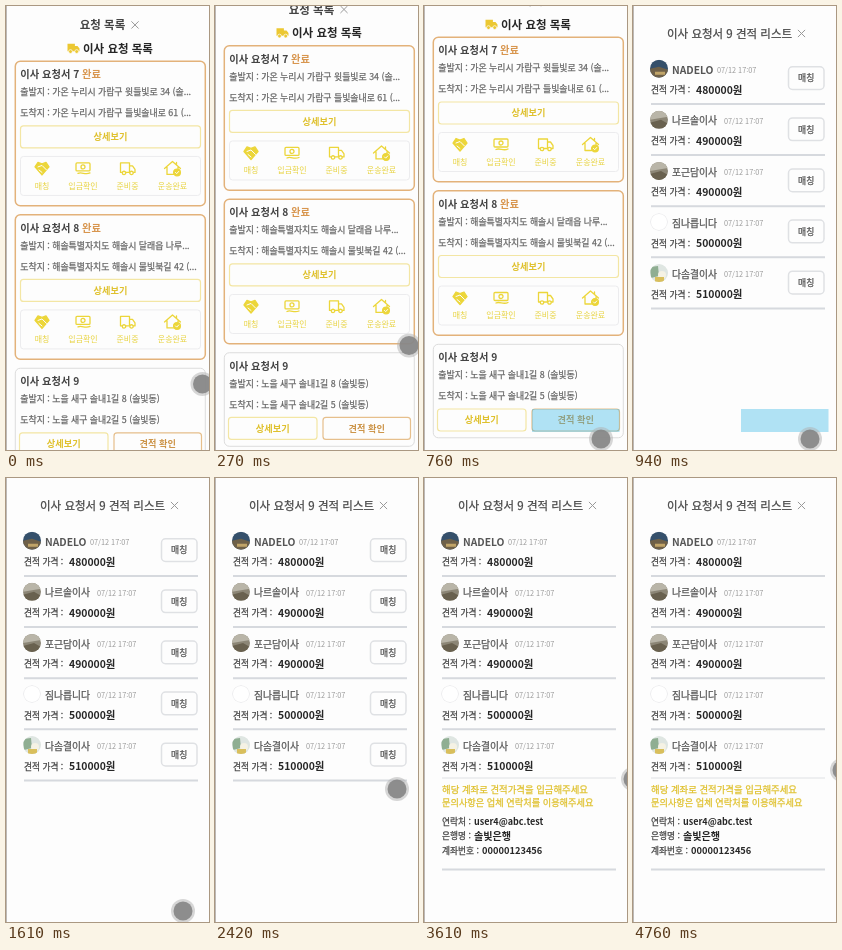
Write an HTML page that moves like this. It is 203 px wide and 444 px high and loops after 4880 ms.

```html
<!DOCTYPE html>
<html lang="ko">
<head>
<meta charset="utf-8">
<style>
html, body { margin: 0; width: 100%; height: 100%; overflow: hidden; background: #fdfdfd; }
svg { display: block; width: 203px; height: 444px; font-family: "Noto Sans CJK KR", "Noto Sans CJK", "Noto Sans", sans-serif; }
.icon { fill: none; stroke: #ecd63a; stroke-width: 1.3; stroke-linejoin: round; stroke-linecap: round; }
.solid { fill: #ecd63a; }
.cut { stroke: #fdfdfd; stroke-width: 1; }
</style>
</head>
<body>
<svg id="stage" viewBox="0 0 203 444"></svg>
<script>
const LOOP = 4880;
const INK = '#444', SOFT = '#686868', DARK = '#262626', GOLD = '#dfc02c', YELLOW = '#e8d444', ORANGE = '#d8964f';
const MEDIUM = 500;

// Text placed by its vertical centre; a hairline outline stands in for the medium weight
const text = (x, cy, size, str, fill = INK, weight = 400, anchor = 'start') =>
  `<text x="${x}" y="${cy + size * .37}" font-size="${size}" fill="${fill}" font-weight="${weight}" text-anchor="${anchor}"` +
  (weight === MEDIUM ? ` stroke="${fill}" stroke-width=".25"` : '') + `>${str}</text>`;
const box = (x, y, w, h, stroke, r = 3, sw = 1, fill = 'none') =>
  `<rect x="${x}" y="${y}" width="${w}" height="${h}" rx="${r}" fill="${fill}" stroke="${stroke}" stroke-width="${sw}"/>`;
const at = (x, y, inner, attrs = '') => `<g transform="translate(${x} ${y})" ${attrs}>${inner}</g>`;
const cross = (x, y) =>
  `<path d="M${x - 3.6} ${y - 3.6}l7.2 7.2m0-7.2l-7.2 7.2" stroke="#999" stroke-width="1" fill="none"/>`;
const rule = (y, w = 2, color = '#d6d9de') =>
  `<path d="M18 ${y}H192" stroke="${color}" stroke-width="${w}"/>`;
const button = (x, y, w, label, color, border) =>
  box(x, y, w, 22, border, 3, 1.2) + text(x + w / 2, y + 11, 9.2, label, color, 700, 'middle');

const steps = [
  [36, '매칭', '<path class="solid" d="M-4-6L0-4.5 4-6 7-1.5 0 6.5-7-1.5Z"/><path class="cut" d="M-4-1.5L0-3 4.5 1.5M-3 1.5L0 4"/>'],
  [77, '입금확인', '<rect x="-7" y="-5.5" width="14" height="8" rx="1"/><circle cy="-1.5" r="2"/><path d="M-5 5C-1 3 2 7 7 4.5"/>'],
  [121.5, '준비중', '<path d="M-7-5.5H2V4H-7ZM2-2.5H5L7.5 1V4H2"/><circle cx="-3.5" cy="4.5" r="1.7" fill="#fdfdfd"/><circle cx="4" cy="4.5" r="1.7" fill="#fdfdfd"/>'],
  [166.5, '운송완료', '<path d="M-8 0L0-7 8 0M-5.5-1.5V6H1M4-6V-4M5.5-1.5V0"/><circle class="solid" cx="4.5" cy="4" r="3.4"/><path class="cut" d="M3 4l1.2 1.2L6.2 3"/>']
];

function card(y, no, from, to, done) {
  const head = `이사 요청서 ${no}` + (done ? ` <tspan fill="${ORANGE}">완료</tspan>` : '');
  let s = box(9.3, .3, 190, done ? 144.5 : 93.5, done ? '#e3b27a' : '#dcdcdc', 5, done ? 1.5 : 1) +
    text(14.3, 13.3, 10.25, head, INK, 700) +
    text(14.3, 31, 8.9, `출발지 : ${from}`, SOFT, MEDIUM) +
    text(14.3, 52, 8.9, `도착지 : ${to}`, SOFT, MEDIUM);
  if (done) {
    s += button(14.5, 65, 180, '상세보기', GOLD, '#f3e6a4') + box(14.5, 95.5, 180, 39, '#ececee');
    for (const [x, label, icon] of steps)
      s += at(x, 107.5, icon, 'class="icon"') + text(x, 125, 8, label, YELLOW, 400, 'middle');
  } else {
    s += button(13.5, 65, 88.5, '상세보기', GOLD, '#f3e6a4') + button(108, 65, 87.5, '견적 확인', '#cc9448', '#e6bf8c');
  }
  return at(0, y, s);
}

const truck = '<path d="M0 0h7.4v7.4H0ZM7.4 2.2H10L12 4.8V7.4H7.4Z" fill="#ecc832"/>' +
  '<g fill="#ecc832" stroke="#fdfdfd" stroke-width=".7"><circle cx="3" cy="7.8" r="1.9"/><circle cx="9.2" cy="7.8" r="1.9"/></g>';

const listPage = text(96.5, 19.2, 11.5, '요청 목록', INK, 700, 'middle') + cross(129, 19) +
  at(61.5, 37.8, truck) + text(77, 42.6, 11.5, '이사 요청 목록', DARK, 700) +
  card(55, 7, '가온 누리시 가람구 윗들빛로 34 (솔...', '가온 누리시 가람구 들빛솔내로 61 (...', true) +
  card(208.5, 8, '해솔특별자치도 해솔시 달래읍 나루...', '해솔특별자치도 해솔시 물빛북길 42 (...', true) +
  card(362, 9, '노을 새구 솔내1길 8 (솔빛동)', '노을 새구 솔내2길 5 (솔빛동)', false);

const wood = '<path d="M-9-9H9V9H-9Z" fill="#8c8676"/><path d="M-9-9H9V-3L-9 0Z" fill="#b9b5a8"/><path d="M-9 3L2 0 9 4V9H-9Z" fill="#69614f"/>';
const movers = [
  ['NADELO', 480000, '<path d="M-9-9H9V9H-9Z" fill="#35506b"/><path d="M-9 0L0-2 9 1V9H-9Z" fill="#6e6048"/><path d="M-4 3H6V6H-4Z" fill="#c0a468"/>'],
  ['나르솔이사', 490000, wood],
  ['포근담이사', 490000, wood],
  ['짐나릅니다', 500000, '<circle r="8.5" fill="#fff" stroke="#ececee"/>'],
  ['다솜결이사', 510000, '<path d="M-9-9H9V9H-9Z" fill="#dfe6e2"/><path d="M-9-6L-1-7 0 3-8 5Z" fill="#8fae92"/><circle cx="3" cy="2" r="4" fill="#f5f2e4"/><path d="M-4 4H5V9H-4Z" fill="#d9bf5c"/>']
];
const PITCH = 51.1;

const rows = movers.map(([name, price, pic], i) => at(0, i * PITCH,
  at(26, 62.7, pic, 'clip-path="url(#round)"') +
  text(39, 63.7, i ? 9.8 : 10.3, name, '#555', i ? MEDIUM : 700) +
  text(i ? 91 : 84, 64.2, 7.3, '07/12 17:07', '#999') +
  text(18, 84, 8.7, '견적 가격 :', INK, MEDIUM) +
  text(63, 84, 10.4, price + '원', DARK, 700) +
  (i < 4 ? rule(98) : ''))).join('');

const matches = movers.map((_, i) =>
  at(0, i * PITCH, box(155.5, 60.8, 35.5, 22.7, '#dfe1e4', 4, 1.5) + text(173.2, 72.2, 8.8, '매칭', '#555', MEDIUM, 'middle'))
).join('') + rule(302.5);

const detail = (y, label, x, value, size) =>
  text(18, y, 8.7, label + ' :', INK, MEDIUM) + text(x, y, size, value, DARK, 700);
const account = rule(300, 1, '#dfe1e4') +
  text(18, 311.5, 9.4, '해당 계좌로 견적가격을 입금해주세요', GOLD, MEDIUM) +
  text(18, 324.5, 9.2, '문의사항은 업체 연락처를 이용해주세요', GOLD, MEDIUM) +
  detail(344, '연락처', 50, 'user4@abc.test', 9) +
  detail(358, '은행명', 50, '솔빛은행', 10.1) +
  detail(373, '계좌번호', 58, '00000123456', 9.3) +
  rule(391.5);

const quotePage = text(34, 27.5, 11.5, '이사 요청서 9 견적 리스트', '#484848', MEDIUM) + cross(168.5, 27.5) + rows +
  `<g id="matches">${matches}</g><g id="account">${account}</g>`;

const stage = document.getElementById('stage');
stage.innerHTML = '<defs><clipPath id="round"><circle r="9"/></clipPath></defs>' +
  '<rect width="203" height="444" fill="#fdfdfd"/>' +
  `<g id="list">${listPage}</g><g id="quotes">${quotePage}</g>` +
  '<rect id="press" x="108" y="403" width="87.5" height="23" fill="rgb(51 181 229 / .38)"/>' +
  '<path d="M.5 0V444" stroke="#bdb9b6"/>' +
  '<g id="touch"><circle r="12" fill="#b0b0b0" opacity=".5"/><circle r="9.5" fill="#858585" opacity=".9"/></g>';

const el = id => document.getElementById(id);
const [list, quotes, press, touch, matchBox, accountBox] =
  ['list', 'quotes', 'press', 'touch', 'matches', 'account'].map(el);

// Rows of [time, ...values], linear between them
const scrollTrack = [[0, 0], [140, 8.5], [270, 15.5], [400, 21], [510, 24]];
const touchTrack = [
  [0, 196.5, 378], [130, 196, 366], [270, 194, 340], [400, 195, 272], [520, 196, 202], [545, 196, 202], [550, 185, 250],
  [640, 180, 370], [760, 177, 433], [2200, 177, 433], [2240, 182, 397], [2410, 182, 397],
  [2420, 182, 311], [2600, 182, 311], [2700, 176, 282], [3090, 178, 282], [3270, 182, 286],
  [3450, 198, 298], [3610, 209, 301], [3790, 209, 292]
];

function sample(track, t) {
  const i = track.findIndex(k => k[0] > t);
  if (i < 0) return track[track.length - 1].slice(1);
  const a = track[i - 1], b = track[i], p = (t - a[0]) / (b[0] - a[0]);
  return a.slice(1).map((v, j) => v + (b[j + 1] - v) * p);
}
const show = (node, on) => node.setAttribute('visibility', on ? 'inherit' : 'hidden');

function draw(t) {
  const opened = t >= 910, matched = t >= 2820;
  show(list, !opened);
  show(quotes, opened);
  show(matchBox, opened && !matched);
  show(accountBox, opened && matched);
  show(press, t >= 730 && t < 985);
  list.setAttribute('transform', `translate(0 ${-sample(scrollTrack, t)[0]})`);
  touch.setAttribute('transform', `translate(${sample(touchTrack, t).join(' ')})`);
}

const start = performance.now();
function tick() {
  draw((performance.now() - start) % LOOP);
  requestAnimationFrame(tick);
}
tick();
</script>
</body>
</html>
```
